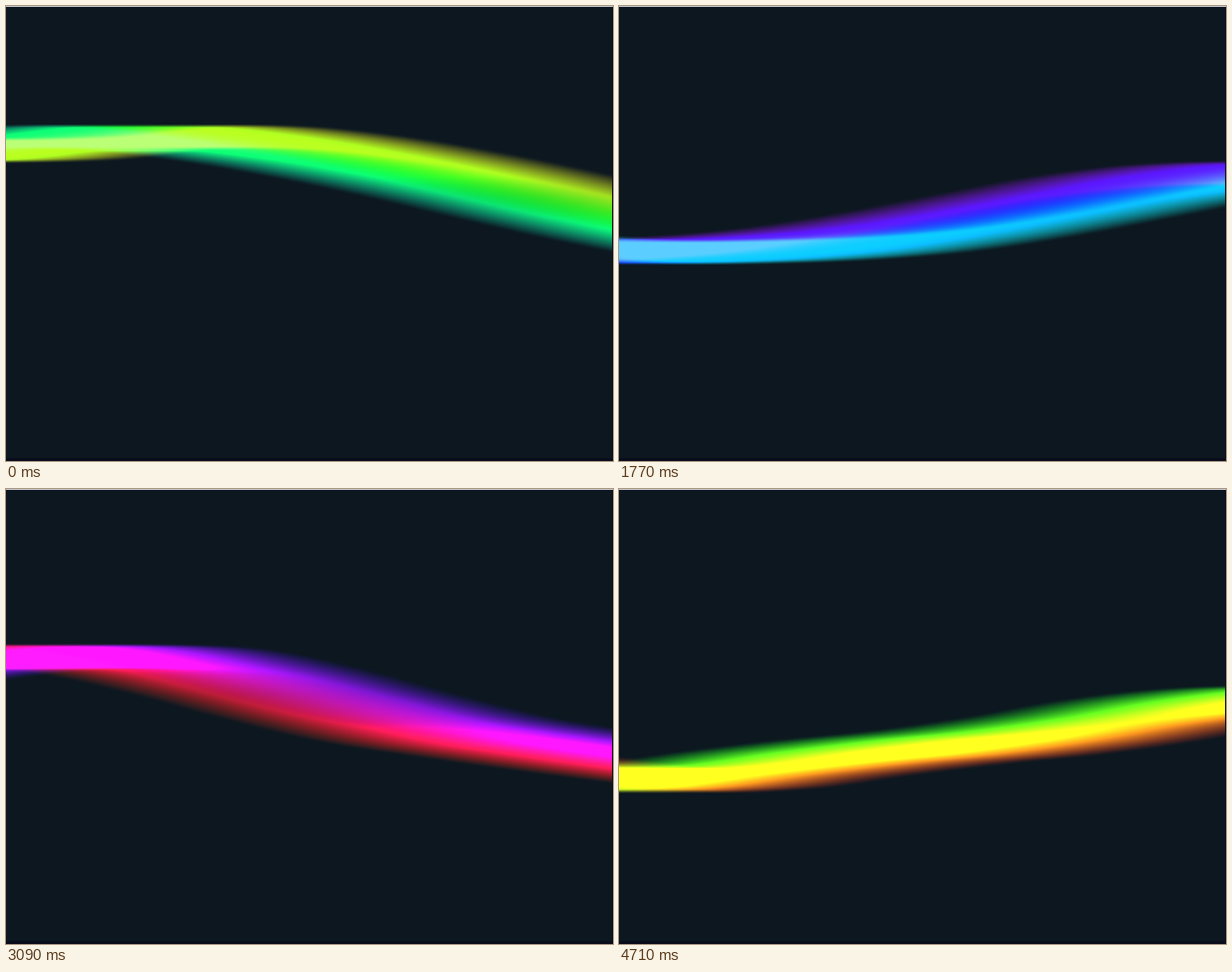
These frames come from a looping animation (640x480 px, 4740 ms). An HTML page with a canvas:

```html
<!DOCTYPE html>
<html>
<head>
<meta charset="utf-8">
<title>Ribbon</title>
<style>
html, body { margin: 0; width: 100%; height: 100%; overflow: hidden; background: #0c1720; }
canvas { display: block; }
</style>
</head>
<body>
<canvas id="stage" width="640" height="480"></canvas>
<script>
const W = 640, H = 480;
const LOOP = 4740, STEP = 30, SCROLL = 16;
const SPREAD = 128, GAP = 4, STRANDS = 2 * SPREAD / GAP + 1;
const HUE = 110, HUE_RANGE = 112, HUE_STEP = 2;
const HALF = 13.5, CORE = 10, POWER = 2.1 * 255 / STRANDS;
const TOP = 100, ROWS = 250;
const BG = [12, 23, 32];

// Heights of the path, one every 100 px
const FIRST = -300;
const knots = [
  146, 150, 152, 149, 138.5, 139, 150, 167, 187.5, 211, 233.5, 252, 259, 258.5,
  254.5, 245.5, 230, 211, 192, 179.5, 176, 181, 202, 229, 253, 269, 283, 296,
  307, 303, 289, 277, 267, 253, 235, 223, 219, 216
];

function pathY(s) {
  const p = (s - FIRST) / 100, i = Math.floor(p), t = p - i;
  const [a, b, c, d] = knots.slice(i - 1, i + 3);
  return b + t / 2 * (c - a + t * (2 * a - 5 * b + 4 * c - d + t * (3 * (b - c) + d - a)));
}

const length = W + LOOP / STEP * SCROLL + 2 * SPREAD - SCROLL;
const path = Float32Array.from({ length }, (_, i) => pathY(i - SPREAD));

const channel = (hue, n) =>
  Math.max(0, Math.min(1, Math.abs((hue / 60 + n) % 6 - 3) - 1)) * POWER;

const ctx = document.getElementById('stage').getContext('2d');
const image = ctx.createImageData(W - 1, ROWS);
const light = new Float32Array((W - 1) * ROWS * 3);

function addStrand(shift, hue) {
  const r = channel(hue, 0), g = channel(hue, 4), b = channel(hue, 2);
  for (let x = 0; x < W - 1; x++) {
    const y = path[x + shift] - TOP;
    const end = Math.floor(y + HALF);
    for (let row = Math.ceil(y - HALF); row <= end; row++) {
      const k = Math.min(1, (HALF - Math.abs(row - y)) / (HALF - CORE));
      const i = (row * (W - 1) + x) * 3;
      light[i] += r * k;
      light[i + 1] += g * k;
      light[i + 2] += b * k;
    }
  }
}

function draw(tick) {
  light.fill(0);
  for (let i = 0; i < STRANDS; i++) {
    const hue = HUE + HUE_RANGE * (i / (STRANDS - 1) - 0.5);
    addStrand(tick * SCROLL + i * GAP, hue + tick * HUE_STEP);
  }
  const px = image.data;
  for (let i = 0, j = 0; i < light.length; i += 3, j += 4) {
    px[j] = BG[0] + light[i];
    px[j + 1] = BG[1] + light[i + 1];
    px[j + 2] = BG[2] + light[i + 2];
    px[j + 3] = 255;
  }
  ctx.putImageData(image, 0, TOP);
}

function rect(color, x, y, w, h) {
  ctx.fillStyle = color;
  ctx.fillRect(x, y, w, h);
}

rect(`rgb(${BG})`, 0, 0, W, H);
rect('#0a0c1c', 0, H - 3, W, 3);
rect('#0a0e18', W - 1, 0, 1, H);
rect('#c8ccd0', 0, 0, W, 1);

let shown = -1;
function frame() {
  const tick = Math.floor(performance.now() % LOOP / STEP);
  if (tick !== shown) draw(shown = tick);
  requestAnimationFrame(frame);
}
frame();
</script>
</body>
</html>
```
